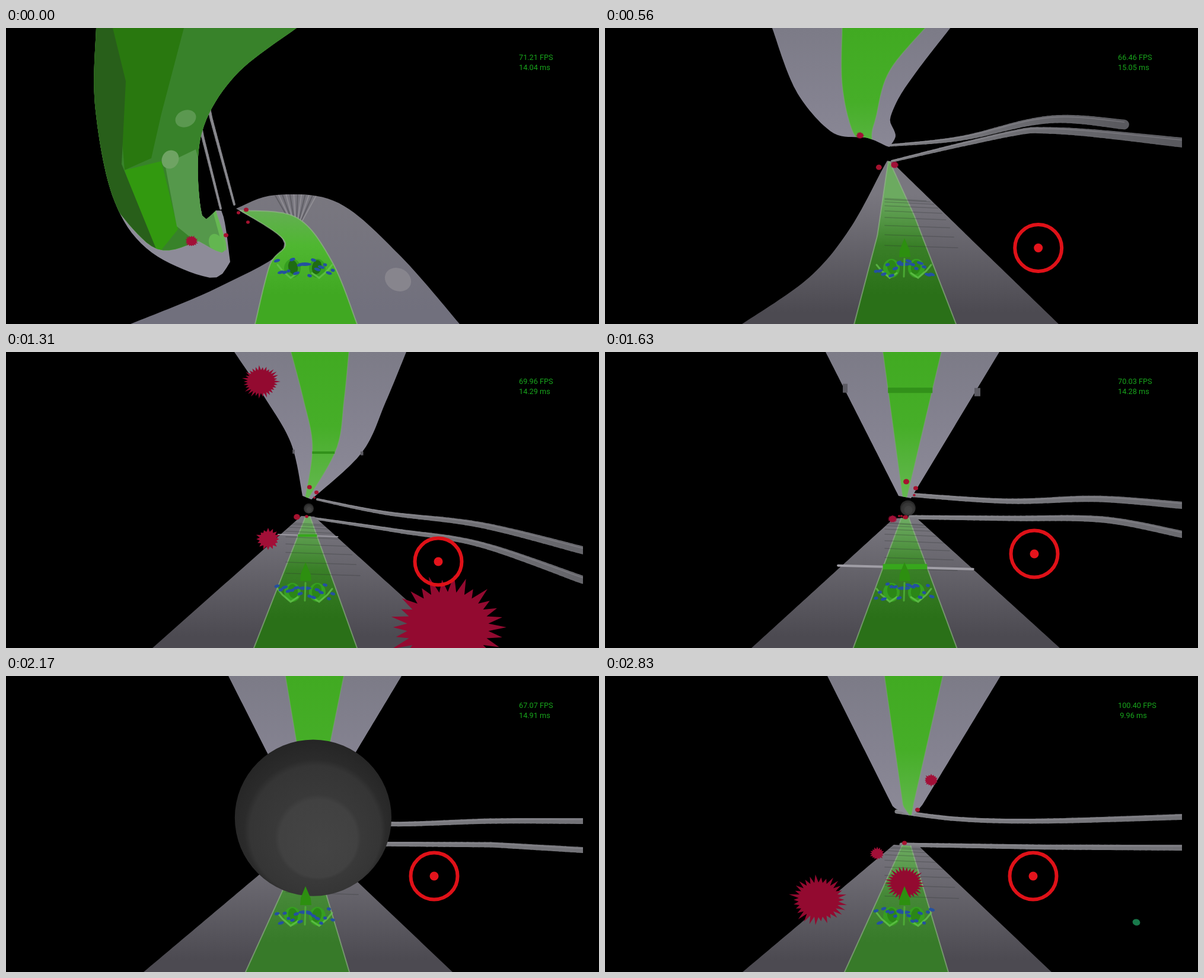
An HTML page with a canvas for the animation above (2930 ms loop, 1000 by 500 pixels).

```html
<!DOCTYPE html>
<html lang="en">
<head>
<meta charset="utf-8">
<title>Track flight</title>
<style>
  html, body { margin: 0; width: 100%; height: 100%; overflow: hidden; background: #000; }
  canvas { display: block; position: absolute; left: 0; top: 0; width: 1000px; height: 500px; }
  #stats {
    position: absolute; left: 865px; top: 42px; margin: 0; white-space: pre;
    font: 12.7px/16.6px Roboto, Arial, sans-serif; color: #18a51c;
  }
</style>
</head>
<body>
<canvas id="view" width="1000" height="500"></canvas>
<p id="stats"></p>
<script>
const LOOP = 2930, N = 48;
const ctx = document.getElementById('view').getContext('2d');
const stats = document.getElementById('stats');
const steps = [0, 60, 150, 230, 320, 380, 470, 560, 640, 720, 790, 870, 960, 1030, 1110,
  1170, 1240, 1310, 1400, 1470, 1550, 1630, 1720, 1800, 1890, 1980, 2070, 2170, 2230,
  2320, 2400, 2490, 2570, 2660, 2740, 2830];

const mix = (a, b, k) => a + (b - a) * k;
const clamp = v => Math.min(1, Math.max(0, v));
const blendLists = (p, q, k) => p.map((v, i) => mix(v, q[i], k));
const blendLines = (p, q, k) => p.map((v, i) => blendLists(v, q[i], k));
const noise = n => { const v = Math.sin(n * 127.1 + 3.7) * 43758.5453; return v - Math.floor(v); };
const rgb = c => `rgb(${c.map(Math.round)})`;
const hex = s => [0, 2, 4].map(i => parseInt(s.slice(i, i + 2), 16));
const pairs = text => text.split(' ').map(s => s.split(',').map(Number));

// Smooths a few points, then spaces N points evenly along the line.
function edge(text) {
  let p = pairs(text);
  if (p.length > 3) {
    const at = i => p[Math.min(p.length - 1, Math.max(0, i))];
    const fine = [];
    for (let i = 0; i < p.length - 1; i++)
      for (let k = 0; k < 1; k += 0.125) {
        const [a, b, c, d] = [at(i - 1), at(i), at(i + 1), at(i + 2)];
        fine.push([0, 1].map(j => b[j] + k / 2 * (c[j] - a[j] +
          k * (2 * a[j] - 5 * b[j] + 4 * c[j] - d[j] + k * (3 * (b[j] - c[j]) + d[j] - a[j])))));
      }
    p = fine.concat([at(p.length)]);
  }
  const far = [0];
  for (let i = 1; i < p.length; i++) far[i] = far[i - 1] + Math.hypot(p[i][0] - p[i - 1][0], p[i][1] - p[i - 1][1]);
  let s = 0;
  return Array.from({ length: N }, (_, i) => {
    const d = far[p.length - 1] * i / (N - 1);
    while (s < p.length - 2 && far[s + 1] < d) s++;
    return blendLists(p[s], p[s + 1], (d - far[s]) / (far[s + 1] - far[s]));
  });
}

// Left and right border, then the green strip; without its own borders it is the middle third.
function track(left, right, ...strip) {
  const [l, r] = [left, right].map(edge);
  const inner = strip.length ? strip.map(edge) : [blendLines(l, r, 0.33), blendLines(l, r, 0.666)];
  return [l, r, ...inner];
}

const poses = [];
const pose = (t, fps, up, low, ...rails) => poses.push({ t, fps, up, low, rails: rails.map(edge) });

pose(0, 71.21,
  track('152,0 150,130 180,285 240,375 345,422 378,395', '490,0 385,82 328,185 331,318 363,308 378,395',
    '140,0 130,200 240,365 325,360', '520,0 350,150 345,270 372,375 325,360'),
  track('210,500 360,437 470,368 388,305', '765,500 665,385 560,295 455,282 388,305',
    '420,500 445,400 470,360 395,308', '592,500 550,395 490,320 395,308'),
  '362,305 332,185 300,20', '385,298 346,153 320,30');

pose(320, 62.87,
  track('233,0 265,125 330,199 400,172 450,163', '540,0 470,60 410,122 450,140 450,163',
    '368,0 346,100 350,177 405,168', '540,0 455,35 415,75 385,135 405,168'),
  track('222,500 350,425 418,325 457,185', '765,500 567,297 457,185',
    '424,500 456,330 457,187', '593,500 510,290 457,187'),
  '452,158 570,100 690,16 800,-8', '462,184 660,68 740,42 973,4');

pose(870, 71.09,
  track('345,0 400,90 490,185 505,246', '637,0 580,130 567,212 518,250'),
  track('243,500 480,290 500,275', '765,500 640,390 515,277'),
  '520,250 640,285 800,316 973,384', '512,278 640,306 790,345 973,438');

pose(1310, 69.96,
  track('385,0 437,78 481,155 500,243', '675,0 640,85 600,170 515,249'),
  track('247,500 498,277', '765,500 520,278'),
  '525,249 640,272 800,292 973,335', '520,281 660,302 800,325 973,385');

pose(1630, 70.03,
  track('372,0 495,243', '665,0 516,247'),
  track('247,500 487,281', '767,500 525,280'),
  '510,241 680,252 830,248 973,259', '515,279 680,281 840,283 973,308');

const ahead = track('232,500 487,285', '753,500 530,288');
pose(2170, 67.07, track('375,0 487,222 510,236', '667,0 535,220'), ahead,
  '515,238 640,250 820,245 973,245', '515,283 820,285 973,294');
pose(2830, 100.4, track('375,0 486,222 510,234', '667,0 535,218 520,236'), ahead,
  '492,229 600,242 740,245 973,238', '500,285 740,289 973,290');

// Each burst passes through points of time, x, y and radius.
const bursts = [];
const burst = (...points) => bursts.push(points);
burst([0, 313, 360, 10], [320, 328, -10, 34]);
burst([0, 371, 350, 4], [320, 405, 178, 5], [870, 489, 190, 9], [1310, 430, 50, 28]);
burst([0, 405, 307, 4], [320, 447, 196, 4], [870, 481, 286, 7], [1310, 442, 316, 18]);
burst([0, 408, 328, 3], [320, 468, 207, 5], [870, 546, 300, 11], [1310, 745, 465, 86]);
burst([0, 392, 312, 3], [320, 440, 222, 4]);
burst([870, 517, 241, 3], [1630, 508, 219, 5], [2070, 500, -70, 60]);
burst([870, 523, 247, 3], [1630, 524, 230, 4], [2830, 550, 176, 11]);
burst([1310, 520, 246, 2], [2830, 527, 226, 4]);
burst([870, 498, 274, 4], [1630, 485, 282, 7], [2070, 190, 490, 90]);
burst([870, 507, 276, 2], [1630, 507, 279, 4], [2830, 506, 350, 29]);
burst([1630, 496, 277, 2], [2830, 360, 378, 42]);
burst([1630, 500, 277, 2], [2830, 459, 300, 11]);
burst([1630, 505, 279, 3], [2830, 505, 282, 4]);

const aim = [[60, 732, 386], [320, 732, 385], [870, 729, 354], [1310, 729, 354], [1630, 724, 341], [2170, 722, 338]];

function span(list, t, time) {
  let i = 0;
  while (i < list.length - 2 && time(list[i + 1]) <= t) i++;
  const a = list[i], b = list[i + 1];
  return [a, b, (t - time(a)) / (time(b) - time(a))];
}

function sceneAt(t) {
  const [a, b, k] = span(poses, t, p => p.t);
  const lines = name => a[name].map((l, i) => blendLines(l, b[name][i], k));
  return { up: lines('up'), low: lines('low'), rails: lines('rails'), fps: mix(a.fps, b.fps, k) };
}

function trace(points, close) {
  ctx.beginPath();
  points.forEach(p => ctx.lineTo(p[0], p[1]));
  if (close) ctx.closePath();
}

const between = (l, r) => trace(l.concat(r.slice().reverse()), true);

function fill(l, r, paint) {
  between(l, r);
  ctx.fillStyle = paint;
  ctx.fill();
}

function inside(l, r, paint) {
  ctx.save();
  between(l, r);
  ctx.clip();
  paint();
  ctx.restore();
}

function fall(y0, y1, ...stops) {
  const g = ctx.createLinearGradient(0, y0, 0, y1);
  stops.forEach((c, i) => g.addColorStop(i / (stops.length - 1), rgb(c)));
  return g;
}

function stroke(points, color, width) {
  trace(points);
  ctx.strokeStyle = color;
  ctx.lineWidth = width;
  ctx.stroke();
}

function oval(x, y, rx, ry, color, turn = 0) {
  ctx.beginPath();
  ctx.ellipse(x, y, rx, ry, turn, 0, 7);
  ctx.fillStyle = color;
  ctx.fill();
}

const xAt = (line, y) => line.reduce((a, b) => Math.abs(b[1] - y) < Math.abs(a[1] - y) ? b : a)[0];

function drawRail(line, t) {
  const w0 = mix(4, 7, clamp((t - 1310) / 320));
  const w1 = t < 320 ? mix(6, 18, t / 320) : mix(18, 10, clamp((t - 320) / 1850));
  ctx.lineCap = 'round';
  for (let i = 1; i < N; i++) {
    const k = i / N, v = Math.round(128 - k * (w1 - 6) * 3.5);
    stroke([line[i - 1], line[i]], `rgb(${v},${v},${v + 5})`, mix(w0, w1, k));
  }
  stroke(line.map((p, i) => [p[0], p[1] - mix(w0, w1, i / N) / 4]), 'rgba(165,164,172,.35)', 1.5);
}

function drawUpper(s, t) {
  const [l, r, gl, gr] = s.up;
  fill(l, r, fall(0, 250, hex('7c7b87'), hex('848290'), hex('8d8b98')));
  inside(l, r, () => {
    fill(gl, gr, fall(0, 250, hex('41aa22'), hex('46ae28'), hex('66b852')));
    [gl, gr].forEach(g => stroke(g, 'rgba(120,170,110,.45)', 1.5));
    if (t < 320) inside(gl, gr, () => drawFacets(t));
  });
}

// Shaded and lit faces of the twisted piece at the start.
function drawFacets(t) {
  ctx.globalAlpha = 1 - t / 320;
  ctx.translate(t * 0.27, -t * 0.7);
  const face = (text, color) => {
    trace(pairs(text), true);
    ctx.fillStyle = color;
    ctx.fill();
  };
  face('140,0 500,0 400,90 345,140 310,400 140,400', '#38822a');
  face('180,0 300,0 262,145 245,220 200,240', '#29780f');
  face('200,240 262,225 290,340 250,390', '#32990f');
  face('140,0 180,0 202,90 195,230 260,390 140,390', '#285f1a');
  face('268,230 320,205 368,380 325,365 288,335', '#55984b');
  oval(277, 222, 14, 16, '#6fa363', 0.5);
  oval(303, 153, 18, 14, '#5b9850', -0.4);
  oval(355, 365, 12, 18, '#63b650', -0.4);
}

function drawLower(s, t) {
  const [l, r, gl, gr] = s.low;
  const early = clamp(1 - t / 320), late = clamp((t - 1980) / 190);
  const near = blendLists(hex('4c4a51'), hex('71707d'), early);
  const green = blendLists(blendLists(hex('2a7018'), hex('377a29'), late), hex('40a822'), early);
  fill(l, r, fall(280, 480, hex('79777f'), near));
  if (early) inside(l, r, () => {
    ctx.globalAlpha = early;
    oval(661, 425, 23, 19, 'rgba(140,138,146,.8)', 0.5);
    for (let i = 0; i < 12; i++)
      stroke([[450 + i * 7, 276], [478 + i * 2, 325]], i % 2 ? 'rgba(165,164,168,.5)' : 'rgba(65,64,70,.45)', 2);
  });
  fill(gl, gr, fall(285, 450, hex('6caa60'), green.map(v => v + 15), green));
  [gl, gr].forEach(g => stroke(g, 'rgba(150,185,140,.6)', 2));

  if (t < 230) return;
  inside(l, r, () => {
    for (let i = 0; i < 9; i++) {
      const k = (i + t / 90 % 1) / 9, y = 290 + 95 * k * k;
      stroke([[472, y - 2], [540 + 60 * k, y + 2]], 'rgba(45,48,48,.28)', 1.5);
    }
  });
}

// The joint in both tracks, coming closer.
function drawJoint(s, t) {
  if (t < 1240 || t > 1790) return;
  const d = 51800 / (1898 - t), yUp = 258 - d, yLow = 266 + d / 2, big = d / 193;
  const [l, r, gl, gr] = s.up, [m, q, gm, gq] = s.low;
  const bar = (a, b, y, h, color) => {
    ctx.fillStyle = color;
    ctx.fillRect(xAt(a, y), y - h / 2, xAt(b, y) - xAt(a, y), h);
  };
  bar(gl, gr, yUp, 9 * big, '#32911a');
  ctx.fillStyle = '#5c5b63';
  ctx.fillRect(xAt(l, yUp) - 5 * big, yUp - 11 * big, 8 * big, 15 * big);
  ctx.fillRect(xAt(r, yUp) - 4 * big, yUp - 4 * big, 10 * big, 14 * big);
  stroke([[xAt(m, yLow) - 2, yLow - 2], [xAt(q, yLow) + 3, yLow + 4 * big]], '#a09ea6', 4 * big);
  bar(gm, gq, yLow, 9 * big, '#37a71c');
}

function drawBurst(points, id, t) {
  if (t < points[0][0]) return;
  const [a, b, k] = span(points, t, p => p[0]);
  const grows = b[3] - a[3] > 3;
  if (k > 1 && (!grows || t > b[0] + 200)) return;
  const r = 1 / mix(1 / a[3], 1 / b[3], k);
  if (r < 0 || r > 200) return;
  const f = grows ? (r - a[3]) / (b[3] - a[3]) : k;
  const x = mix(a[1], b[1], f), y = mix(a[2], b[2], f);
  if (r < 6) return oval(x, y, r, r * 0.9, '#a5122f');
  const spikes = r > 25 ? 30 : 16;
  const rim = Array.from({ length: spikes * 2 }, (_, i) => {
    const turn = i * Math.PI / spikes;
    const reach = r * (i % 2 ? 0.8 : 0.98 + 0.24 * noise(i + id * 41));
    return [x + Math.cos(turn) * reach, y + Math.sin(turn) * reach * 0.87];
  });
  trace(rim, true);
  ctx.fillStyle = r > 25 ? '#930a30' : '#a20f37';
  ctx.fill();
}

function drawBall(t) {
  if (t < 790 || t >= 2230) return;
  const r = 1 / (0.0001283 * (2229 - t)), x = 510 + r * 0.06, y = 266 - r * 0.2;
  const g = ctx.createRadialGradient(x + r * 0.12, y + r * 0.4, 0, x, y + r * 0.1, r * 1.1);
  g.addColorStop(0, '#444');
  g.addColorStop(0.45, '#414141');
  g.addColorStop(0.5, '#393939');
  g.addColorStop(0.76, '#353535');
  g.addColorStop(0.82, '#2b2b2b');
  g.addColorStop(1, '#252525');
  oval(x, y, r, r, g);
}

function drawShip(t) {
  for (const side of [-1, 1]) {
    const x = d => 504 + side * d;
    oval(x(21), 406, 14, 16, '#369f20');
    oval(x(20), 404, 8, 12, t < 60 ? '#1f6c12' : '#2b8717', side * 0.2);
    stroke([[x(12), 414], [x(24), 422], [x(38), 410], [x(46), 400]], 'rgba(105,200,80,.7)', 3);
    for (let i = 0; i < 7; i++) {
      const id = i + side * 20 + t * 0.37;
      oval(x(8 + i * 6.5), 391 + 28 * noise(id), 3 + 3 * noise(id + 9), 2.6, '#2451a0', side * 0.3);
    }
  }
  oval(504, 399, 11, 3, '#2451a0');
  if (t < 60) return;
  trace(pairs('505,355 514,376 515,387 496,387 497,375'), true);
  ctx.fillStyle = '#2d8f10';
  ctx.fill();
  stroke([[505, 390], [504, 420]], 'rgba(80,180,55,.8)', 3);
}

function drawAim(t) {
  if (t < aim[0][0]) return;
  const [a, b, k] = span(aim, t, p => p[0]);
  const [, x, y] = blendLists(a, b, clamp(k));
  ctx.beginPath();
  ctx.arc(x, y, 39.5, 0, 7);
  ctx.strokeStyle = '#df1118';
  ctx.lineWidth = 6;
  ctx.stroke();
  oval(x, y, 7.5, 7.5, '#e4141c');
}

function draw(t) {
  const s = sceneAt(t);
  ctx.fillStyle = '#000';
  ctx.fillRect(0, 0, 1000, 500);
  ctx.save();
  ctx.beginPath();
  ctx.rect(0, 0, 973, 500);
  ctx.clip();
  s.rails.forEach(line => drawRail(line, t));
  drawUpper(s, t);
  drawLower(s, t);
  drawJoint(s, t);
  bursts.forEach((points, i) => drawBurst(points, i, t));
  drawBall(t);
  drawShip(t);
  drawAim(t);
  if (t >= 2740) oval(896, 416, 6.5, 5.5, '#187a4b', 0.3);
  ctx.restore();
  stats.textContent = `${s.fps.toFixed(2)} FPS\n${(1000 / s.fps).toFixed(2).padStart(5)} ms`;
}

const start = performance.now();
let shown = -1;
function tick() {
  const now = (performance.now() - start) % LOOP;
  const t = steps.filter(v => v <= now).pop() || 0;
  if (t !== shown) draw(shown = t);
  requestAnimationFrame(tick);
}
tick();
</script>
</body>
</html>
```
